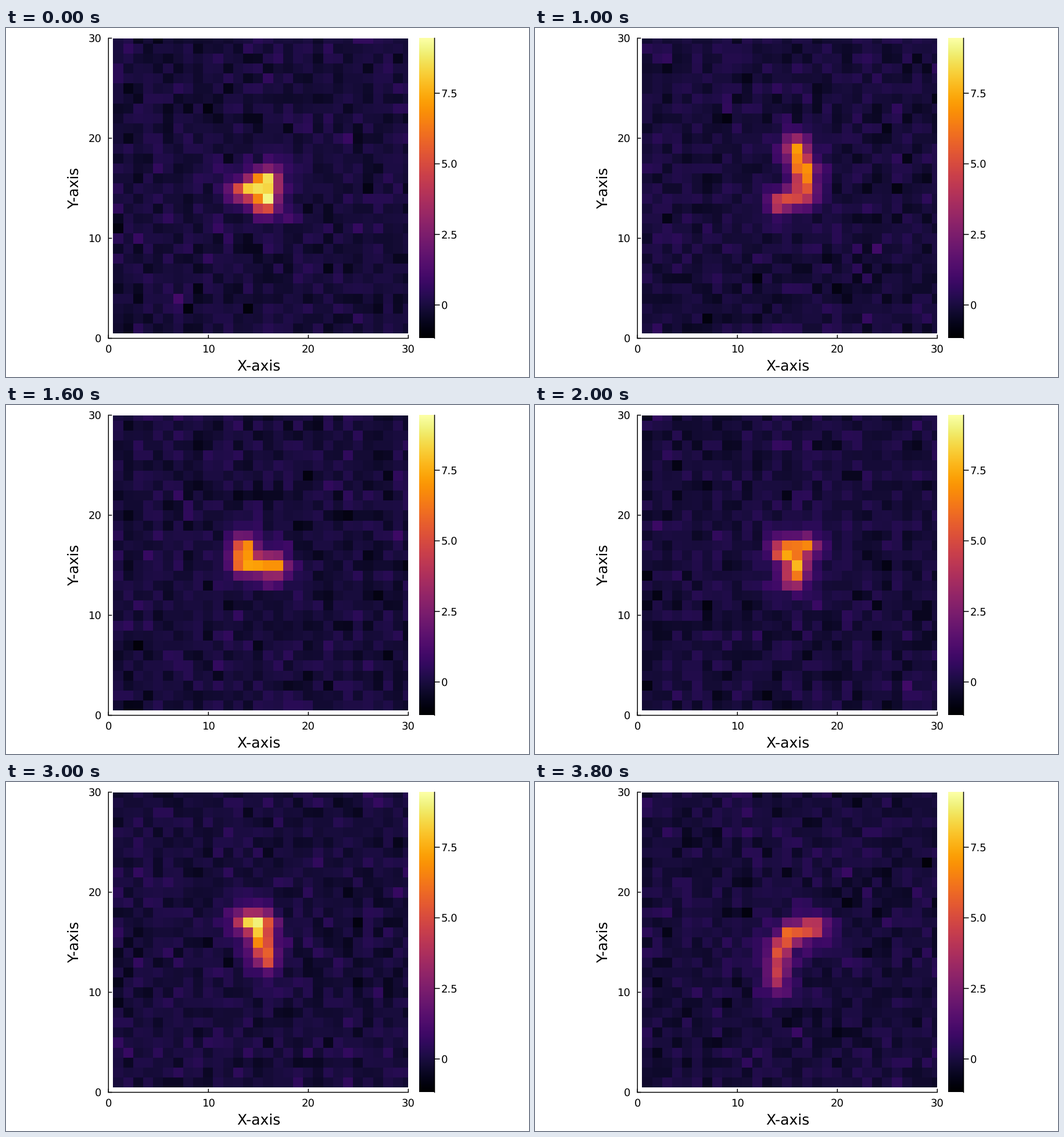
Animation, 900 px wide and 600 px high, one loop 4000 ms. Source, as a matplotlib script:

```python
import numpy as np
import matplotlib.pyplot as plt
from matplotlib.animation import FuncAnimation

W, H, DPI = 900, 600, 100
N, FRAMES, STEP = 30, 20, 200
X0, Y0, CELL = 176.3, 533.5, 17.2
VMIN, VMAX = -1.18, 9.45
CORE, FADE = .45, 1.45  # radius of the hot path, decay of its halo
PX = 72 / DPI  # points per pixel

plt.rcParams.update({"font.family": "DejaVu Sans", "text.hinting": "none",
                     "text.hinting_factor": 1})

# Bent hot path at a few ticks of the loop: x, y, heat at each corner
PATHS = {
    0: [(13, 14.8, 4.3), (14.6, 15, 9), (16, 15.8, 8.8), (15.6, 13.7, 9.2)],
    2: [(13, 15.3, 5), (16, 15.6, 6.8), (18, 14.2, 8.2), (15.3, 14.4, 6)],
    5: [(16, 19, 7), (16.7, 16.3, 6.6), (16.6, 14.4, 4.8), (14.1, 13.6, 4.6)],
    7: [(12, 17, 7.2), (13, 14.8, 7.4), (17, 14.7, 6.8), (17.4, 15.8, 4.2)],
    10: [(16.9, 16.8, 6.4), (14.6, 16.4, 7.2), (16, 15.3, 7.5), (15.6, 13.7, 5.4)],
    15: [(14, 17, 8.5), (15.2, 16.9, 9), (15.3, 15.4, 7.2), (15.8, 13.4, 4.8)],
    19: [(17.6, 16.5, 5.4), (15.3, 15.8, 5.8), (14.2, 14, 5.3), (14, 11, 3.6)],
}
PATHS[FRAMES] = PATHS[0]
ticks = np.array(list(PATHS))
corners = np.array(list(PATHS.values()))
cols, rows = np.meshgrid(np.arange(1, N + 1), np.arange(1, N + 1))


def path_at(i):
    """Corners blended between ticks, then sampled along the path."""
    k = np.searchsorted(ticks, i, side="right") - 1
    t = (i - ticks[k]) / (ticks[k + 1] - ticks[k])
    bent = (1 - t) * corners[k] + t * corners[k + 1]
    s = np.linspace(0, len(bent) - 1, 40)
    return [np.interp(s, range(len(bent)), c) for c in bent.T]


def field(i):
    rng = np.random.default_rng(400 + i)
    heat = np.zeros((N, N))
    for x, y, v in zip(*path_at(i)):
        gap = np.maximum(np.hypot(cols - x, rows - y) - CORE, 0)
        heat = np.maximum(heat, v * np.exp(-FADE * gap))
    return heat + rng.normal(-.1, .26, (N, N))


fig = plt.figure(figsize=(W / DPI, H / DPI), dpi=DPI, facecolor="white")
ax = fig.add_axes([0, 0, 1, 1])
ax.axis("off")


def line(xs, ys):
    ax.plot(xs, ys, color="black", lw=1.5 * PX, solid_capstyle="butt",
            snap=False, zorder=4)


def label(x, y, text, size=18, **kw):
    ax.text(x, y, text, fontsize=size * PX, va="baseline",
            rotation_mode="anchor", **kw)


edges = np.minimum(np.arange(N + 1) + .5, N)
mesh = ax.pcolormesh(np.floor(X0 + CELL * edges), np.ceil(Y0 - CELL * edges),
                     field(0), cmap="inferno", vmin=VMIN, vmax=VMAX,
                     antialiased=False)

# axes
top, right = Y0 - CELL * N, X0 + CELL * N
line([X0, X0], [top - .7, Y0 + .7])
line([X0 - .7, right + .7], [Y0, Y0])
for v in range(0, N + 1, 10):
    x, y = X0 + CELL * v, Y0 - CELL * v
    line([x, x], [Y0, Y0 - 6])
    line([X0, X0 + 6], [y, y])
    label(x, 557.5, str(v), ha="center")
    label(164.4, y + 6.5, str(v), ha="right")
label(434.5, 588.5, "X-axis", 24.6, ha="center")
label(125, 275.5, "Y-axis", 24.6, ha="center", rotation=90)

# colour bar
ax.imshow(np.linspace(1, 0, 256)[:, None], cmap="inferno", aspect="auto",
          extent=(710.5, 737.5, Y0, top), interpolation="bilinear")
line([737.5] * 2, [top - .7, Y0 + .7])
for v, text in ((0, "0"), (2.5, "2.5"), (5, "5.0"), (7.5, "7.5")):
    y = Y0 - (v - VMIN) / (VMAX - VMIN) * (Y0 - top)
    line([737.5, 746.5], [y, y])
    label(749, y + 6.5, text, ha="left")
ax.set(xlim=(0, W), ylim=(H, 0))


def update(i):
    mesh.set_array(field(i))
    return (mesh,)


anim = FuncAnimation(fig, update, frames=FRAMES, interval=STEP, repeat=True,
                     repeat_delay=0, blit=False)
plt.show()
```
